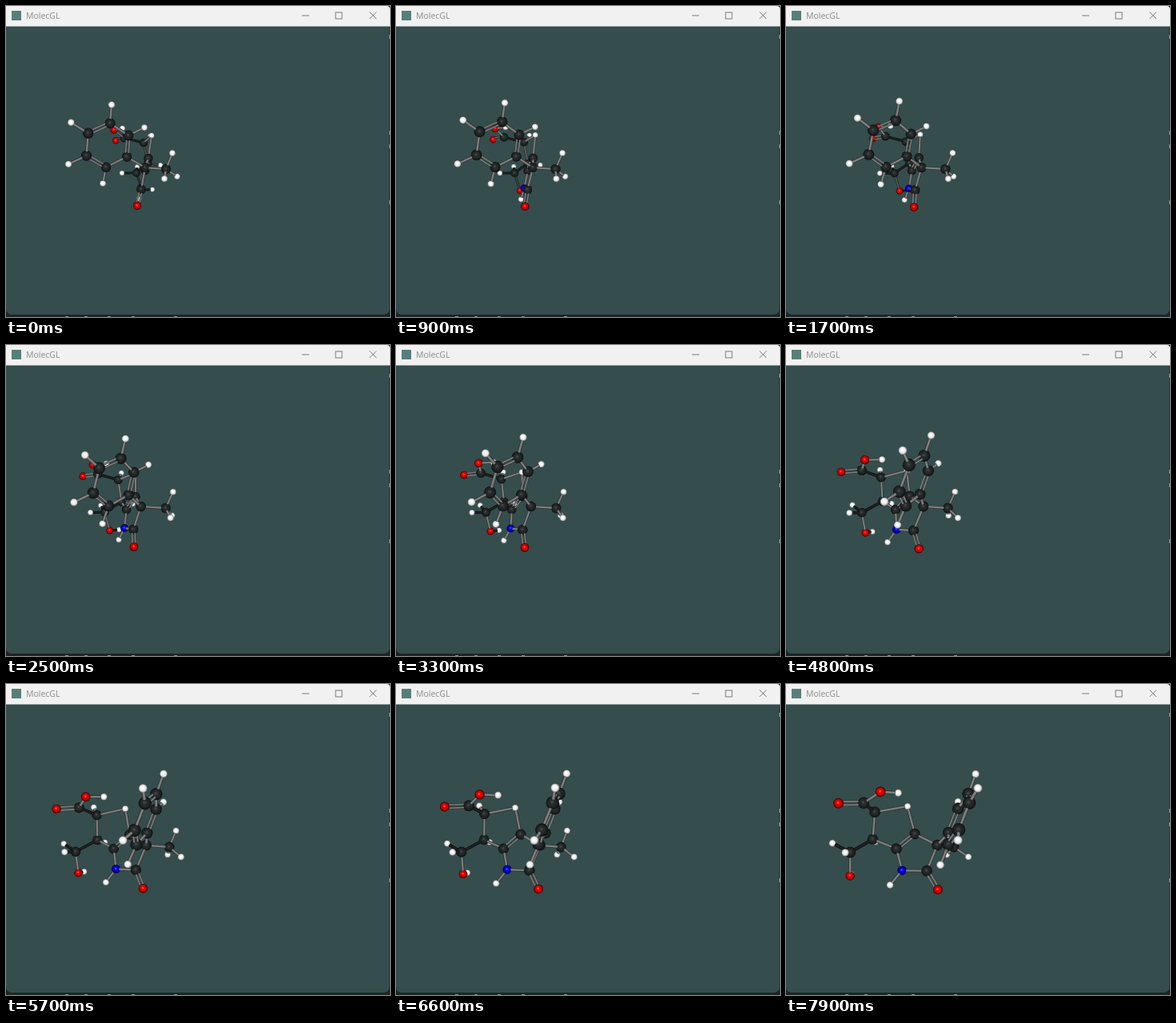
An HTML page with a canvas that plays this animation: 480x389 px, repeating every 8 s.

```html
<!DOCTYPE html>
<html lang="en">
<head>
<meta charset="utf-8">
<title>MolecGL</title>
<style>
  html, body { margin: 0; width: 480px; height: 389px; overflow: hidden; background: #1f2424; }
  canvas { position: absolute; left: 0; top: 0; }
  h1 {
    position: absolute; left: 25px; top: 0; margin: 0; color: #8b8b8b;
    font: 400 10.5px/24px "Open Sans", "Noto Sans", sans-serif;
  }
</style>
</head>
<body>
<canvas id="stage" width="480" height="389"></canvas>
<h1>MolecGL</h1>
<script>
const ctx = document.getElementById("stage").getContext("2d");
const LOOP = 8000, STEP = 100, DEG_PER_SEC = 10;
const EYE = 440, CX = 240, CY = 205, AXIS = -22;

const KINDS = {
  C: { r: 6.2, tones: ["#4c5050", "#2b2e2e", "#1f2222", "#0d0f0f"] },
  H: { r: 3.9, tones: ["#ffffff", "#fafafa", "#e2e2e2", "#6c7171"] },
  O: { r: 5.2, tones: ["#ff6464", "#ea0404", "#be0000", "#240000"] },
  N: { r: 5.2, tones: ["#5c5cff", "#0b0be6", "#0000bc", "#000028"] }
};

// Element and position; atoms are lettered a-z, then A-J.
const ATOMS = [
  // phenyl ring a-f, its hydrogens g-k
  ["C", -80.9, -54.6, 28.3], ["C", -104.6, -42.3, 34.3], ["C", -109.4, -16.8, 25.4],
  ["C", -90.4, -3.3, 10], ["C", -66.3, -16.2, 3.3], ["C", -62.5, -41.8, 12.8],
  ["H", -77.4, -75, 35], ["H", -120.2, -53.2, 45.7], ["H", -129, -6.7, 29.7],
  ["H", -96, 16.7, 3.5], ["H", -43.8, -52, 8],
  // methyl branch l-p
  ["C", -46.3, -3, -15.5], ["C", -18.3, -1, -3.4], ["H", -10, -21, 0.6],
  ["H", -18.6, 10.7, 14.4], ["H", -5, 8.5, -16.2],
  // lactam q-v
  ["C", -53.1, 25.7, -25.4], ["O", -56, 46, -11.6], ["N", -58, 25.2, -52.7],
  ["H", -62.7, 41.3, -64.9], ["C", -53.2, 1, -61.6], ["C", -46, -16, -42.3],
  // second ring w-A
  ["H", -42.9, -48.1, -52.4], ["C", -59.1, -40.6, -85], ["H", -51.3, -52, -99.7],
  ["C", -53.5, -10, -90.4], ["H", -35.3, -7.2, -96.9],
  // alcohol arm B-F
  ["C", -73.7, 4.8, -106.9], ["H", -75.9, -5.2, -127], ["H", -94.6, 4.9, -99.9],
  ["O", -65.7, 31.6, -111.7], ["H", -50.5, 31.2, -119.5],
  // acid group G-J
  ["C", -87.4, -47.2, -83.1], ["O", -104.4, -45.2, -101.4],
  ["O", -97.1, -56.8, -59.2], ["H", -82.5, -57.5, -46.5]
];
const LETTERS = "abcdefghijklmnopqrstuvwxyzABCDEFGHIJ";

// "=" is a double bond, "." one turned away from the light.
const BONDS = ("a=b b-c c=d d-e e=f f-a a-g b-h c-i d-j f-k e-l l-m m-n m-o m-p " +
  "l-q q=r q-s s-t s-u u=v v-l v-w w-x x-y x-z z-A z-u z.B B.C B.D B-E E.F " +
  "x.G G=H G-I I-J").split(" ").map(b => ({
    from: LETTERS.indexOf(b[0]), kind: b[1], to: LETTERS.indexOf(b[2])
  }));

function project(x, y, z) {
  const s = 1 / (1 - z / EYE);
  return { x: CX + x * s, y: CY + y * s, z, s };
}

function line(x1, y1, x2, y2, width, color) {
  ctx.strokeStyle = color;
  ctx.lineWidth = width;
  ctx.beginPath();
  ctx.moveTo(x1, y1);
  ctx.lineTo(x2, y2);
  ctx.stroke();
}

const grey = v => `rgb(${v},${v + 1},${v + 1})`;

function rod(p, q, shift, width, light) {
  const len = Math.hypot(q.x - p.x, q.y - p.y) || 1;
  let nx = -(q.y - p.y) / len, ny = (q.x - p.x) / len;
  if (ny > 0) { nx = -nx; ny = -ny; }
  const put = (off, w, v) => line(p.x + nx * off, p.y + ny * off,
    q.x + nx * off, q.y + ny * off, w, grey(v));
  put(shift, width, Math.round(light * 0.4));
  put(shift, width * 0.58, light);
}

function drawBond(a, b, kind) {
  const d = [b.X - a.X, b.Y - a.Y, b.Z - a.Z];
  const len = Math.hypot(...d);
  const at = k => project(a.X + d[0] * k, a.Y + d[1] * k, a.Z + d[2] * k);
  const p = at(a.r * 0.85 / len), q = at(1 - b.r * 0.85 / len);
  const s = (p.s + q.s) / 2;
  let light = kind === "." ? 32 : 126;
  if (s < 0.88 && kind !== ".") light -= Math.min(75, (0.88 - s) * 1000);
  light = Math.round(light);
  if (kind === "=") {
    rod(p, q, -1.8 * s, 2.5 * s, light);
    rod(p, q, 1.8 * s, 2.5 * s, light);
  } else {
    rod(p, q, 0, 3.6 * s, light);
  }
}

function drawAtom(a) {
  const r = a.r * a.s;
  const g = ctx.createRadialGradient(a.x - r * 0.1, a.y - r * 0.15, 0, a.x, a.y, r);
  [0, 0.3, 0.7, 1].forEach((k, i) => g.addColorStop(k, a.tones[i]));
  ctx.fillStyle = g;
  ctx.beginPath();
  ctx.arc(a.x, a.y, r, 0, Math.PI * 2);
  ctx.fill();
}

function drawMolecule(angle) {
  const c = Math.cos(angle), s = Math.sin(angle);
  const atoms = ATOMS.map(([el, x, y, z]) => {
    const X = AXIS + x * c + z * s, Z = z * c - x * s;
    return { X, Y: y, Z, ...KINDS[el], ...project(X, y, Z) };
  });
  const parts = atoms.map(a => ({ z: a.Z, draw: () => drawAtom(a) }));
  for (const { from, kind, to } of BONDS) {
    const a = atoms[from], b = atoms[to];
    parts.push({ z: (a.Z + b.Z) / 2, draw: () => drawBond(a, b, kind) });
  }
  parts.sort((m, n) => m.z - n.z).forEach(part => part.draw());
}

function panel(y, w, h, corners, color) {
  ctx.fillStyle = color;
  ctx.beginPath();
  ctx.roundRect(0, y, w, h, corners);
  ctx.fill();
}

function drawWindow() {
  ctx.fillStyle = "#1f2424";
  ctx.fillRect(0, 0, 480, 389);
  ctx.fillStyle = "#8b9090";
  for (const x of [74, 98, 127, 157, 210]) ctx.fillRect(x, 388, 4, 1);
  panel(20, 479.5, 366, [0, 0, 7, 7], "#354d4d");
  panel(0, 480, 25.4, [0, 4, 0, 0], "#f1f1f1");
  ctx.fillStyle = "#8f9999";
  for (const y of [36, 156, 173, 243]) ctx.fillRect(479, y, 1, 5);
  ctx.fillStyle = "#577f79";
  ctx.fillRect(7, 6, 12, 12);

  const ink = "#7a7a7a";
  line(370, 12, 379, 12, 1, ink);
  ctx.strokeRect(412, 8, 8, 8);
  line(454.5, 7.5, 463, 16, 1, ink);
  line(463, 7.5, 454.5, 16, 1, ink);
}

function frame(now) {
  const t = Math.floor((now % LOOP) / STEP) * STEP;
  drawWindow();
  drawMolecule(t / 1000 * DEG_PER_SEC * Math.PI / 180);
  requestAnimationFrame(frame);
}
requestAnimationFrame(frame);
</script>
</body>
</html>
```
